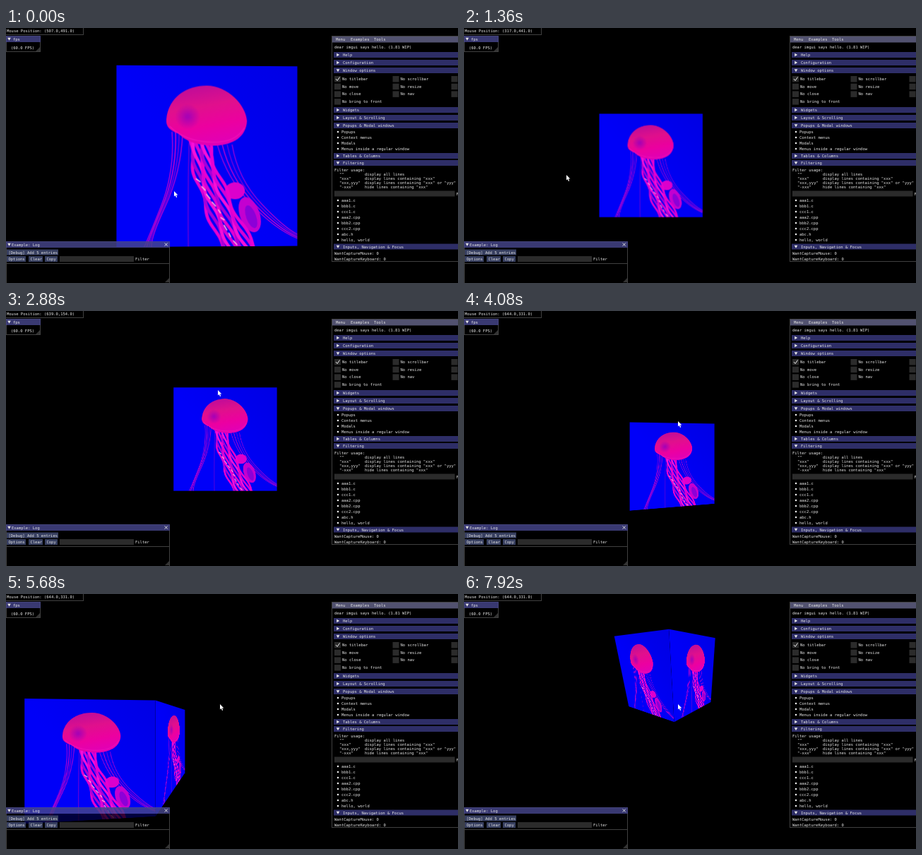
Write an HTML page with a canvas that moves like this. It is 640 by 361 pixels and loops after 8000 ms.

```html
<!DOCTYPE html>
<html lang="en">
<head>
<meta charset="utf-8">
<title>Textured cube with debug panels</title>
<style>
  html, body { margin: 0; width: 100%; height: 100%; overflow: hidden; background: #000; }
  #scene { position: absolute; inset: 0; overflow: hidden; perspective: 195px; perspective-origin: 320px 180px; }
  #cube { position: absolute; left: 320px; top: 180px; transform-style: preserve-3d; }
  canvas { position: absolute; left: 0; top: 0; }
  #cube canvas { left: -128px; top: -128px; backface-visibility: hidden; }
</style>
</head>
<body>
<div id="scene"><div id="cube"></div></div>
<canvas id="ui" width="640" height="361"></canvas>
<script>
const LOOP = 8000, SIZE = 256, FOCAL = 195;
const cube = document.getElementById('cube');
const ui = document.getElementById('ui').getContext('2d');

// time, cube centre seen from the camera (in cube sides), yaw, camera pitch
const cubeKeys = [
  [0, -.14, .006, 1.262, -.5, 0],
  [1360, -.377, .1, 1.831, 0, 0],
  [2880, -.065, .01, 1.831, 0, 0],
  [4080, -.27, .32, 2.13, -9.5, 0],
  [5680, -1.2, .32, 1.64, -5, 0],
  [7040, -1.05, .32, 1.81, 41, 0],
  [7920, -.32, .285, 2.28, 35.5, 26]
];

// time, pointer position, reported position
const mouseKeys = [
  [0, 238, 231, 507, 491],
  [1360, 145, 208, 317, 441],
  [2880, 300, 112, 639, 154],
  [3400, 303, 156, 644, 331]
];

function sample(keys, t) {
  const i = keys.findIndex(k => k[0] > t);
  if (i < 0) return keys[keys.length - 1].slice(1);
  const a = keys[i - 1], b = keys[i], u = (t - a[0]) / (b[0] - a[0]);
  const ease = u * u * (3 - 2 * u);
  return a.slice(1).map((v, j) => v + (b[j + 1] - v) * ease);
}

function gradient(g, ...colors) {
  colors.forEach((c, i) => g.addColorStop(i / (colors.length - 1), c));
  return g;
}

function paintJellyfish(c) {
  let seed = 7;
  const rand = () => (seed = seed * 16807 % 2147483647) / 2147483647;
  const line = (d, color, width) => {
    c.strokeStyle = color;
    c.lineWidth = width;
    c.stroke(new Path2D(d));
  };
  const blob = (x, y, rx, ry, turn, color) => {
    c.fillStyle = color;
    c.beginPath();
    c.ellipse(x, y, rx, ry, turn, 0, 7);
    c.fill();
  };
  c.fillStyle = gradient(c.createLinearGradient(90, 130, 256, 0), '#0000f8', '#0000e4');
  c.fillRect(0, 0, SIZE, SIZE);
  c.lineCap = c.lineJoin = 'round';

  // thin tentacles
  const tints = ['#a000d8', '#c400cc', '#7400dc'];
  for (let i = 0; i < 4; i++) {
    line(`M${78 + i * 5} 94Q${82 + i * 3} 150 ${62 + i * 2} 200T${38 + i * 4} 258`, tints[i % 3], 1.5);
    line(`M${142 + i * 7} 112Q${156 + i * 5} 160 ${190 + i * 5} 196T258 ${246 - i * 2}`, tints[i % 3], 1.3);
  }
  line('M102 110Q100 180 101 256', '#5c00dc', 1.5);

  // frilled arms
  blob(167, 177, 14, 12, 0, '#dc00cc');
  blob(188, 211, 14, 26, -.35, '#c400d0');
  blob(190, 214, 7, 17, -.35, '#8c00d8');
  const armTints = ['#e800d0', '#a800d8', '#f810d8', '#d800d4'];
  for (let i = 0; i < 9; i++) {
    const s = (i - 4) / 4;
    let d = '';
    for (let y = 104; y <= 260; y += 4) {
      const u = (y - 104) / 152;
      const x = 116 + 55 * u ** 1.4 + s * (13 + 10 * u) + 3 * Math.sin(u * 15 + i * 1.7);
      d += (d ? 'L' : 'M') + x.toFixed(1) + ' ' + y;
    }
    line(d, armTints[i % 4], 4.5);
  }
  for (let i = 0; i < 9; i++) {
    const y = 160 + i * 11, x = 112 + i * 5 + rand() * 14;
    line(`M${x} ${y}l${2 + rand() * 4} ${3 + rand() * 4}`, '#ffb0dc', 1.6);
  }

  // bell
  c.fillStyle = gradient(c.createLinearGradient(118, 28, 134, 114), '#c00c98', '#e0108c', '#ec00a0', '#e000b8');
  c.fill(new Path2D('M70 76C73 44 99 28 127 28C157 28 183 56 184 78' +
    'C183 100 165 112 139 113C111 113 97 106 87 96C75 92 69 86 70 76Z'));
  c.fillStyle = gradient(c.createRadialGradient(100, 72, 2, 100, 72, 18), 'rgba(150,0,190,.75)', 'rgba(150,0,190,0)');
  c.fillRect(80, 52, 40, 40);
  line('M75 86Q95 106 131 108T180 88', '#f010b8', 1.4);
}

const HEADER = 'rgb(46,46,103)', BUTTON = 'rgb(55,63,96)', FRAME = 'rgb(43,43,43)';

function box(x, y, w, h, color) {
  ui.fillStyle = color;
  ui.fillRect(x, y, w, h);
}
// y is the middle of the line
function text(s, x, y) {
  ui.fillStyle = '#e6e6e6';
  ui.fillText(s, x, y + 2);
}
function poly(color, x, y, ...p) {
  ui.fillStyle = color;
  ui.beginPath();
  for (let i = 0; i < p.length; i += 2) ui.lineTo(x + p[i], y + p[i + 1]);
  ui.fill();
}
function panel(x, y, w, h, bar = 0) {
  box(x, y + bar, w, h - bar, 'rgba(0,0,0,.75)');
  ui.strokeStyle = 'rgba(128,128,128,.5)';
  ui.lineWidth = 1;
  ui.strokeRect(x + .5, y + .5, w - 1, h - 1);
}
function arrow(x, y, open) {
  if (open) poly('#e6e6e6', x, y, -2.3, -1.8, 2.3, -1.8, 0, 2.2);
  else poly('#e6e6e6', x, y, -1.8, -2.3, 2.2, 0, -1.8, 2.3);
}
function header(s, y, open) {
  box(464, y - 4, 176, 8, HEADER);
  arrow(470, y, open);
  text(s, 477, y);
}
function bullet(s, y) {
  ui.fillStyle = '#e6e6e6';
  ui.beginPath();
  ui.arc(470, y, 1.3, 0, 7);
  ui.fill();
  text(s, 475, y);
}
function check(s, x, y) {
  box(x, y - 4, 9, 8.5, FRAME);
  text(s, x + 11, y);
}
function button(s, x, y, w) {
  box(x, y - 4, w, 8, BUTTON);
  text(s, x + 2.5, y);
}
function titled(s, y, w, h, textX) {
  panel(0, y, w, h, 9);
  box(0, y, w, 9, 'rgba(69,69,138,.83)');
  arrow(4.5, y + 4.5, true);
  text(s, textX, y + 4.5);
}
const grip = (x, y) => poly('rgba(255,255,255,.2)', x, y, 0, 0, -6, 0, 0, -6);

function drawDemo() {
  panel(461, 11, 200, 320);
  box(462, 12, 178, 8.5, 'rgb(82,82,112)');
  text('Menu', 467, 16);
  text('Examples', 488, 16);
  text('Tools', 521, 16);
  text('dear imgui says hello. (1.81 WIP)', 465, 27);
  header('Help', 38);
  header('Configuration', 49);
  header('Window options', 60, true);
  ['No titlebar', 'No move', 'No close', 'No bring to front'].forEach((s, i) => check(s, 465, 72 + i * 10.7));
  ['No scrollbar', 'No resize', 'No nav'].forEach((s, i) => {
    check(s, 547.5, 72 + i * 10.7);
    check('', 630.5, 72 + i * 10.7);
  });
  ui.strokeStyle = '#e6e6e6';
  ui.stroke(new Path2D('M467 72l2 2.5l3.5-5'));
  header('Widgets', 116);
  header('Layout & Scrolling', 127);
  header('Popups & Modal windows', 138, true);
  ['Popups', 'Context menus', 'Modals', 'Menus inside a regular window'].forEach((s, i) => bullet(s, 147 + i * 8));
  header('Tables & Columns', 181);
  header('Filtering', 191, true);
  text('Filter usage:', 465, 200.5);
  [['""', 'display all lines'],
   ['"xxx"', 'display lines containing "xxx"'],
   ['"xxx,yyy"', 'display lines containing "xxx" or "yyy"'],
   ['"-xxx"', 'hide lines containing "xxx"']].forEach(([a, b], i) => {
    text(a, 472, 207 + i * 6.1);
    text(b, 508, 207 + i * 6.1);
  });
  box(465, 230.5, 170.5, 8, FRAME);
  text('Filter', 637.5, 234.5);
  ['aaa1.c', 'bbb1.c', 'ccc1.c', 'aaa2.cpp', 'bbb2.cpp', 'ccc2.cpp', 'abc.h', 'hello, world']
    .forEach((s, i) => bullet(s, 244 + i * 8));
  header('Inputs, Navigation & Focus', 309.5, true);
  text('WantCaptureMouse: 0', 465, 319);
  text('WantCaptureKeyboard: 0', 465, 326.5);
}

function drawLog() {
  titled('Example: Log', 302, 232, 60, 8);
  ui.strokeStyle = '#e6e6e6';
  ui.stroke(new Path2D('M224.7 304.5l4 4m0-4l-4 4'));
  button('[Debug] Add 5 entries', 1, 317.5, 73);
  button('Options', 1, 327, 27);
  button('Clear', 32, 327, 20);
  button('Copy', 55, 327, 18);
  box(76, 323, 105, 8, FRAME);
  text('Filter', 183, 327);
  box(1, 333, 230, 1, 'rgba(128,128,128,.5)');
  grip(231, 360);
}

function frame(now) {
  const t = now % LOOP;
  const [x, y, z, yaw, pitch] = sample(cubeKeys, t);
  cube.style.transform = `translateZ(${FOCAL}px) rotateX(${-pitch}deg) ` +
    `translate3d(${x * SIZE}px,${y * SIZE}px,${-z * SIZE}px) rotateY(${-yaw}deg)`;

  const [px, py, mx, my] = sample(mouseKeys, t);
  ui.clearRect(0, 0, 640, 361);
  ui.font = '5.5px "DejaVu Sans Mono", monospace';
  panel(-1, -1, 111, 11);
  text(`Mouse Position: (${Math.round(mx)}.0,${Math.round(my)}.0)`, 1, 3.5);
  titled('fps', 11, 49, 23, 10);
  text('(60.0 FPS)', 7, 27.5);
  grip(48, 33);
  drawLog();
  drawDemo();
  poly('#fff', px, py, 0, 0, 0, 7.6, 1.8, 6, 3, 9, 4.2, 8.5, 3, 5.6, 5.4, 5.4);
  requestAnimationFrame(frame);
}

for (let i = 0; i < 4; i++) {
  const face = document.createElement('canvas');
  face.width = face.height = SIZE;
  face.style.transform = `rotateY(${i * 90}deg) translateZ(${SIZE / 2}px)`;
  paintJellyfish(face.getContext('2d'));
  cube.append(face);
}
requestAnimationFrame(frame);
</script>
</body>
</html>
```
